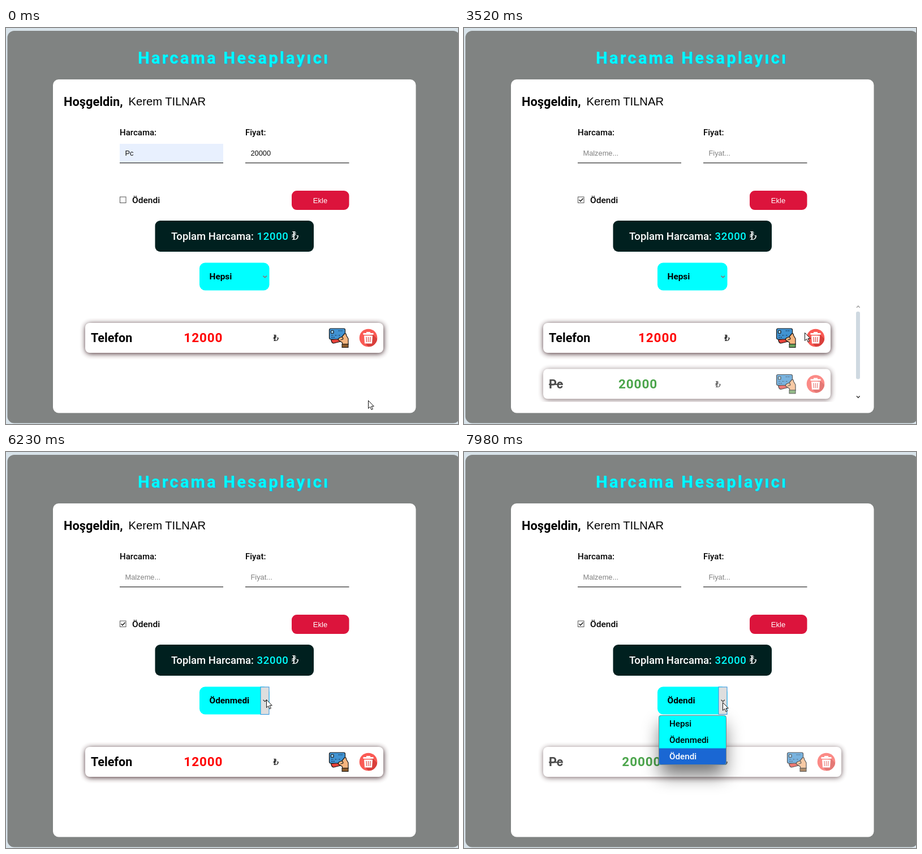
Write an HTML page that moves like this. It is 799 by 701 pixels and loops after 8 s.

```html
<!DOCTYPE html>
<html lang="tr">
<head>
<meta charset="utf-8">
<title>Harcama Hesaplayıcı</title>
<style>
html, body { margin: 0; width: 100%; height: 100%; overflow: hidden; background: #d8e3ea; }
svg { display: block; width: 799px; height: 701px; font-family: Roboto, "Open Sans", sans-serif; font-weight: 500; }
.b { font-weight: 700; }
.a { font-family: "Liberation Sans", sans-serif; font-weight: 400; }
.l { font-family: "Liberation Serif", "DejaVu Serif", serif; font-weight: 400; }
.title { font-size: 29px; letter-spacing: 3.3px; }
.in { font-size: 12.8px; }
.num { font-size: 22.5px; letter-spacing: .9px; }
.sel { font-size: 15.4px; }
.opt { font-size: 15.2px; }
</style>
</head>
<body>
<svg viewBox="0 0 799 701">
  <defs>
    <filter id="soft" x="-10%" y="-60%" width="120%" height="220%"><feGaussianBlur stdDeviation="4.6"/></filter>
    <filter id="wide" x="-60%" y="-80%" width="220%" height="260%"><feGaussianBlur stdDeviation="16"/></filter>
    <clipPath id="view"><rect x="129" y="486" width="572" height="176"/></clipPath>
    <clipPath id="pop"><rect x="344" y="466" width="119.5" height="88" rx="4"/></clipPath>
    <clipPath id="disc"><circle r="15.8"/></clipPath>

    <g id="card" stroke="#151515" stroke-width="1.2" stroke-linejoin="round">
      <path d="M4 21L22 17L25 23L9 27Q6 27 5 24Z" fill="#e8423a"/>
      <rect x="1" y="1" width="28" height="19" rx="2.5" fill="#4193d2"/>
      <rect x="4" y="4.5" width="4.5" height="5" rx="1" fill="#9cd3f2"/>
      <path d="M17 5h8M4.500 13h4M11 13h4M17.500 13h3M4.500 16.500h7" stroke="#14304e" stroke-dasharray="2.500 1"/>
      <path d="M17 19Q20 16 23 16L28 10Q31 9 31 13L34.500 19V29H24V26L18 22Q16 21 17 19Z" fill="#f6b57f"/>
      <path d="M23 16Q26 17 25 20L21 21" fill="none"/>
    </g>

    <g id="bin">
      <circle r="15.8" fill="#fa5a54"/>
      <path d="M6-8L20 6V20H4L-6 9Z" fill="#d93f3b" clip-path="url(#disc)"/>
      <path d="M-9-8.500h5.500v-2h7v2H9v3H-9Z" fill="#fff"/>
      <path d="M-7.500-4H7.500L6.500 10H-6.500Z" fill="#fff"/>
      <path d="M-3.500-1.500L-3 7.500M0-1.500V7.500M3.500-1.500L3 7.500" stroke="#e0504b" stroke-width="1.3"/>
    </g>
  </defs>

  <rect width="799" height="701" fill="#d8e3ea"/>
  <rect x="2.500" y="5" width="800" height="694.500" rx="12" fill="#808382"/>
  <text class="b title" x="234.500" y="64" fill="#2c9fce">Harcama Hesaplayıcı</text>
  <text class="b title" x="233" y="62.500" fill="#00ffff">Harcama Hesaplayıcı</text>
  <rect x="83" y="91" width="641.500" height="590.500" rx="10" fill="#fff"/>

  <text class="b" x="102" y="138" font-size="21.8">Hoşgeldin,</text>
  <text class="a" x="216.500" y="137" font-size="20.200">Kerem TILNAR</text>
  <text x="201" y="190" font-size="15">Harcama:</text>
  <text x="423" y="190" font-size="15">Fiyat:</text>
  <rect id="fill" x="201" y="205" width="183" height="34" fill="#e8f0fe"/>
  <path d="M201 238.700H384M423 238.700H606.500" stroke="#505050" stroke-width="1.500"/>
  <text id="what" class="a in" x="210.500" y="226"/>
  <text id="cost" class="a in" x="432.500" y="226"/>

  <rect x="201.500" y="299" width="10.500" height="10.500" fill="#fff" stroke="#555"/>
  <path id="tick" d="M203.500 304.300l2.400 2.500l4.600-5" fill="none" stroke="#111" stroke-width="1.400"/>
  <text x="223" y="310" font-size="15.500">Ödendi</text>
  <rect x="505" y="288" width="101.500" height="34" rx="9" fill="#dc143c"/>
  <text class="a" x="555.500" y="310" font-size="13" fill="#fff" text-anchor="middle">Ekle</text>

  <rect x="263.500" y="341" width="280.500" height="55" rx="9" fill="#00201f"/>
  <text x="292" y="375" font-size="18.500" fill="#fff">Toplam Harcama:</text>
  <text id="total" x="443.500" y="375" font-size="18.500" letter-spacing=".7" fill="#00ffff"/>
  <text class="l" x="505" y="375" font-size="19.500" fill="#fff">₺</text>

  <g id="list" clip-path="url(#view)"></g>
  <g id="bar">
    <rect x="693" y="502" width="7" height="119.500" rx="3" fill="#cfd9e1"/>
    <g fill="none" stroke-width="1.500">
      <path d="M694 495l2.800-3l2.800 3" stroke="#a0a0a0"/>
      <path d="M694 651.500l2.800 3l2.800-3" stroke="#333"/>
    </g>
  </g>

  <rect id="shade" x="347" y="482" width="114" height="90" filter="url(#wide)"/>
  <rect x="342" y="415.500" width="123.500" height="49" rx="10" fill="#00ffff"/>
  <rect id="hover" x="450" y="416" width="15" height="48.500" fill="#dedede" stroke="#2c94e0"/>
  <path id="chev" d="M454.500 438.700l3.200 3l3.200-3" fill="none" stroke-width="1.200"/>
  <text id="pick" class="b sel" x="359.500" y="444.500"/>

  <g id="menu">
    <g clip-path="url(#pop)">
      <rect x="344" y="466" width="120" height="88" fill="#00ffff"/>
      <rect id="mark" x="344" width="120" height="29" fill="#1a67d3"/>
    </g>
    <g id="opts" class="opt"></g>
    <rect x="344.500" y="466.500" width="119" height="87" rx="4" fill="none" stroke="#76858a"/>
  </g>

  <circle id="ring" r="12.500" fill="#dcd622" opacity=".68"/>
  <path id="arrow" d="M.5.5V14.500L3.700 11.500L6 16.700L8.300 15.700L6 10.700H10.300Z" fill="#fff" stroke="#111"/>
</svg>
<script>
const LOOP = 8000;
const $ = id => document.getElementById(id);
const show = (id, on) => $(id).setAttribute('visibility', on ? 'visible' : 'hidden');
const set = (id, text) => { if ($(id).textContent !== text) $(id).textContent = text; };
const within = (t, a, b) => t >= a && t < b;

const names = ['Hepsi', 'Ödenmedi', 'Ödendi'];
const goods = [
  { name: 'Telefon', price: 12000, x: 308, lira: 460, ink: 'red' },
  { name: 'Pc', price: 20000, x: 273, lira: 444, ink: 'green', paid: true }
];
$('opts').innerHTML = names.map((n, i) => `<text x="363" y="${485.5 + 29 * i}">${n}</text>`).join('');

// Pointer stops: time, x, y
const path = [
  [0, 640, 659], [860, 204, 303], [930, 203, 302], [1150, 203, 302], [1560, 552, 307],
  [2050, 552, 307], [2240, 567, 369], [2640, 618, 580], [2900, 619, 566], [3170, 623, 553],
  [3380, 623, 553], [3520, 602, 539], [3840, 457, 438], [4200, 457, 438], [4780, 402, 507],
  [5060, 402, 505], [5200, 402, 505], [5940, 459, 440], [6090, 460, 438], [6400, 460, 438],
  [6720, 417, 531], [7120, 417, 531], [7450, 457, 443], [LOOP, 457, 443]
];
const clicks = [[1080, 1200], [1760, 1900], [4040, 4170], [4990, 5200], [6300, 6400], [6850, 7060], [7780, 7860]];
const opens = [[4110, 5200], [6370, 7120], [7850, LOOP]];

function pointer(t) {
  const i = path.findIndex(p => p[0] > t);
  const [t0, x0, y0] = path[i - 1], [t1, x1, y1] = path[i];
  const u = (t - t0) / (t1 - t0), k = u * u * (3 - 2 * u);
  return [x0 + (x1 - x0) * k, y0 + (y1 - y0) * k];
}

function row(g, y, single) {
  const wide = single ? 19 : 0;
  const sleeve = single ? '#8b5a2b' : '#67a05a';
  return `<g transform="translate(0 ${y})"${g.paid ? ' opacity=".7"' : ''}>
    <rect x="140" y="1" width="${509 + wide}" height="54" rx="9" fill="#42252b" opacity=".9" filter="url(#soft)"/>
    <rect x="140" width="${508 + wide}" height="53" rx="8" fill="#fff"/>
    <text class="b" x="150" y="34" font-size="21.5"${g.paid ? ' text-decoration="line-through"' : ''}>${g.name}</text>
    <text class="b num" x="${g.x + wide / 3}" y="34" fill="${g.ink}">${g.price}</text>
    <text class="l" x="${g.lira + wide * .65}" y="32" font-size="15.5">₺</text>
    <g transform="translate(${551.5 + wide} 9)"><use href="#card"/>
      <rect x="23.500" y="28.500" width="11" height="6" fill="${sleeve}" stroke="#151515"/></g>
    <use href="#bin" x="${621.5 + wide}" y="26.500"/>
  </g>`;
}

let shown = '';
function drawList(ids) {
  if (shown === ids) return;
  shown = ids;
  $('list').innerHTML = [...ids].map((id, i) => row(goods[id], 522 + 81.5 * i, ids.length === 1)).join('');
  show('bar', ids.length > 1);
}

function draw(t) {
  const [x, y] = pointer(t);
  const added = t >= 1830;
  const choice = t < 5200 ? 0 : t < 7120 ? 1 : 2;
  const open = opens.find(o => within(t, ...o));

  set('what', added ? 'Malzeme...' : 'Pc');
  set('cost', added ? 'Fiyat...' : '20000');
  for (const id of ['what', 'cost']) $(id).setAttribute('fill', added ? '#808080' : '#111');
  show('fill', !added);
  show('tick', t >= 1080);
  set('total', added ? '32000' : '12000');
  drawList(!added ? '0' : ['01', '0', '1'][choice]);

  set('pick', names[choice]);
  const over = open || (x > 342 && x < 465 && y > 415 && y < 465);
  show('hover', over);
  $('chev').setAttribute('stroke', over ? '#333' : '#a5525c');

  show('menu', open);
  $('shade').setAttribute('opacity', open ? .55 * Math.min(1, (t - open[0]) / 120) : 0);
  if (open) {
    const hot = y > 467 ? Math.min(2, Math.floor((y - 467) / 29)) : choice;
    $('mark').setAttribute('y', 466 + 29 * hot + (hot ? .5 : 0));
    [...$('opts').children].forEach((o, i) => o.setAttribute('fill', i === hot ? '#fff' : '#000'));
  }

  show('ring', clicks.some(c => within(t, ...c)));
  for (const id of ['ring', 'arrow']) $(id).setAttribute('transform', `translate(${x} ${y})`);
}

const start = performance.now();
function tick() {
  draw((performance.now() - start) % LOOP);
  requestAnimationFrame(tick);
}
tick();
</script>
</body>
</html>
```
